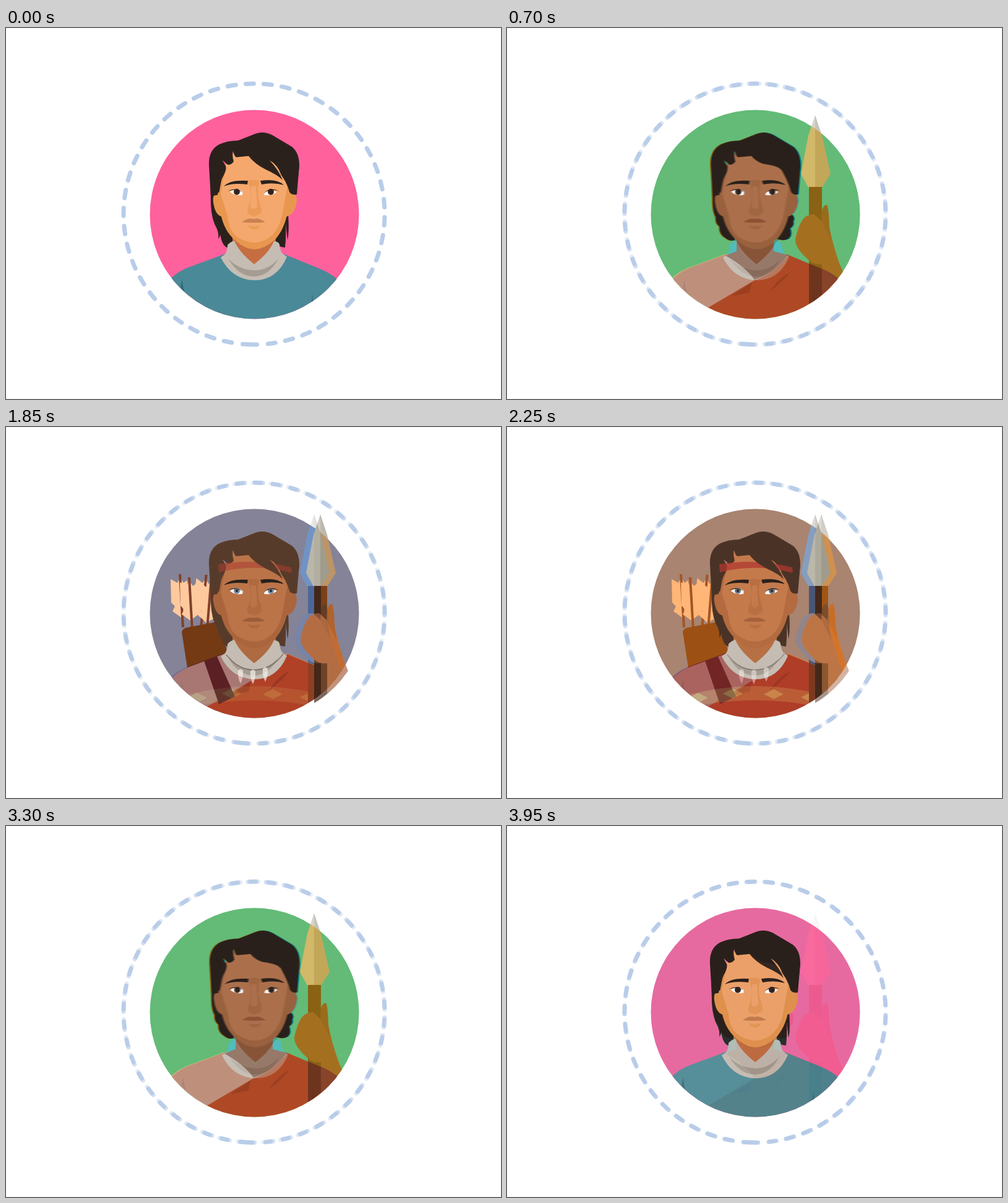
An HTML page for the animation above (4000 ms loop, 800 by 600 pixels).

```html
<!DOCTYPE html>
<html lang="en">
<head>
<meta charset="utf-8">
<title>Portraits</title>
<style>
html, body { margin: 0; width: 100%; height: 100%; overflow: hidden; background: #fff; }
svg { display: block; width: 800px; height: 600px; }

.bg { fill: var(--bg); }
.skin { fill: var(--skin); }
.shade { fill: var(--shade); }
.neck { fill: var(--neck); }
.hair { fill: var(--hair); }
.iris { fill: var(--iris); }
.lip { fill: var(--lip); }
.cloth { fill: var(--cloth); }
.fold { fill: var(--fold); }
.dark { fill: #2a211d; }
.white { fill: #fff; }
.page { fill: #fff; stroke: #f6f6f6; }
.ring { fill: none; stroke: #b9cde9; stroke-width: 7; stroke-linecap: round; }

.modern { --bg: #ff619d; --skin: #f5a86d; --shade: #e9974f; --neck: #c66e42; --hair: #2b211c;
  --iris: #3a2620; --lip: #c98150; --cloth: #4a8997; --fold: #326878; }
.elder { --bg: #03bcc0; --skin: #8c5f48; --shade: #7b513b; --neck: #774b37; --hair: #2b211c;
  --iris: #3a2620; --lip: #70432f; --cloth: #c9c0b6; --fold: #8f3a1f; }
.autumn { --bg: #f6b80b; --skin: #d98a50; --shade: #c87a44; --neck: #a4623b; --hair: #2b211c;
  --iris: #3a2620; --lip: #bb6c40; --cloth: #ae4a26; --fold: #8a2a22; }
.knit { --bg: #ff8312; --skin: #d98a50; --shade: #ca7b44; --neck: #cb7f48; --hair: #2b211c;
  --iris: #5f463c; --lip: #bd7040; --cloth: #ae312b; --fold: #8a2624; }
.hunter { --bg: #5185d1; --skin: #ae6a46; --shade: #9d5c3b; --neck: #a3623f; --hair: #6b4731;
  --iris: #86abcc; --lip: #8f5336; --cloth: #a69793; --fold: #8f3a1f; }

/* forward for two seconds, then back again */
.fade { opacity: 0; animation: 4s -2ms steps(10, end) infinite; }
.elder { animation-name: fade1; }
.autumn { animation-name: fade2; }
.knit { animation-name: fade3; }
.hunter { animation-name: fade4; }
@keyframes fade1 { 0% { opacity: 0 } 12.5%, 87.5% { opacity: 1 } 100% { opacity: 0 } }
@keyframes fade2 { 0%, 12.5% { opacity: 0 } 25%, 75% { opacity: 1 } 87.5%, 100% { opacity: 0 } }
@keyframes fade3 { 0%, 25% { opacity: 0 } 37.5%, 62.5% { opacity: 1 } 75%, 100% { opacity: 0 } }
@keyframes fade4 { 0%, 37.5% { opacity: 0 } 50% { opacity: 1 } 62.5%, 100% { opacity: 0 } }
</style>
</head>
<body>
<svg viewBox="0 0 800 600">
<defs>
  <clipPath id="disc"><circle cx="401.5" cy="301.5" r="169"/></clipPath>

  <g id="stage">
    <rect class="page" x=".5" y=".5" width="799" height="599"/>
    <circle class="bg" cx="401.5" cy="301.5" r="169"/>
  </g>

  <g id="ring" class="ring">
    <path d="M371.6 509.9A211 211 0 1 1 430.4 509.9" stroke-dasharray="13 16.16"/>
    <path d="M412.5 511.7Q401 512.3 389.5 511.7"/>
  </g>

  <path id="body" class="cloth" d="M250 425Q266 400 290 389L352 366H450L511 391Q536 402 552 425L570 480H240Z"/>
  <g id="folds" class="fold">
    <path d="M285 406Q285 417 289 428Q284 424 282 419Z"/>
    <path d="M495 429L496 441L494 444Z"/>
  </g>

  <path id="longhair" class="hair" d="M330 225L331 285Q332 310 341 325Q344 332 343 341Q348 335 346 327Q346 342 352 351Q359 359 370 354L434 347Q440 354 451 355Q453 338 452 316L455 343Q458 330 456 300L470 260L474 222Z"/>
  <path id="shorthair" class="hair" d="M330 225L331 285Q332 300 336 306Q335 316 342 321Q341 334 352 340Q362 348 372 340H432Q444 346 454 341Q461 336 457 324Q464 320 462 313Q466 306 458 300L470 260L474 222Z"/>

  <path id="neck" class="neck" d="M366 330H436V350L401 384L366 350Z"/>
  <g id="collar">
    <path fill="#c5bdb4" d="M358 351Q362 346 369 344Q376 362 401 382Q425 364 433 345Q440 345 442 350Q443 361 447 365L454 370Q438 408 401 408Q365 407 347 371L354 366Q358 360 358 351Z"/>
    <path fill="#a59c92" d="M359 373Q376 402 401 402Q426 401 440 373Q425 391 402 392Q376 391 359 373Z"/>
  </g>

  <g id="face">
    <path class="shade" d="M346 266Q333 265 335 282Q338 303 349 305ZM455 267Q470 264 470 280Q467 302 453 305Z"/>
    <path class="shade" d="M352 225L344 268L347 300Q352 328 371 344Q387 358 402 358Q418 357 434 343Q450 326 455 298L461 250L446 215Q402 190 365 204Z"/>
    <path class="skin" d="M357 215L347 268L358 304Q360 328 374 338Q388 347 402 347Q420 346 431 334Q444 320 447 298L455 255L444 222Q402 190 365 204Z"/>
    <path class="shade" d="M391 247Q401 243 410 248Q406 258 408 275L413 293Q414 300 408 302L401 305L393 302Q388 299 391 291Q396 280 395 262Z" opacity=".65"/>
    <path class="skin" d="M396 256H404L406 288Q401 296 395 289Z"/>
    <path class="shade" d="M391 319Q401 322 411 319Q409 326 401 326Q393 325 391 319Z" opacity=".7"/>
    <path class="lip" d="M381 314Q392 306 400 309Q408 306 419 314Q400 316 381 314Z"/>
    <path class="white" d="M362 265Q372 257 383 265L382 270Q369 272 362 265ZM417 270Q419 258 438 265Q430 272 417 270Z"/>
    <circle class="iris" cx="373" cy="265" r="5"/>
    <circle class="iris" cx="428" cy="265" r="5"/>
    <circle class="dark" cx="373" cy="265" r="2"/>
    <circle class="dark" cx="428" cy="265" r="2"/>
    <path class="dark" d="M358 264Q372 256 384 267Q373 259 358 264ZM417 267Q427 256 442 264Q428 259 417 267Z"/>
    <path class="dark" d="M352 256Q362 245 391 247L390 253Q367 250 352 256ZM411 247Q438 243 449 254Q432 249 413 253Z"/>
  </g>

  <path id="longtop" class="hair" d="M331 272L328 222Q327 197 345 188Q358 182 375 182L403 171Q416 166 430 173L462 192Q474 202 474 222Q472 247 470 269Q462 271 458 265Q454 250 445 238Q439 221 426 214Q441 230 447 246Q440 238 420 229Q402 220 392 207L372 209Q369 207 367 199Q365 206 368 216Q364 222 358 221L350 214Q353 220 355 223Q357 228 352 238Q345 250 342 270Z"/>
  <path id="shorttop" class="hair" d="M331 272L328 222Q327 197 345 188Q358 182 375 182L403 171Q416 166 430 173L462 192Q474 202 474 222Q472 247 470 269Q462 271 458 265Q454 250 444 232Q440 223 414 220Q401 216 394 207L372 209Q369 207 367 199Q365 206 368 216Q364 222 358 221L350 214Q353 220 355 223Q357 228 352 238Q345 250 342 270Z"/>

  <g id="longhead">
    <use href="#face"/><use href="#longtop"/>
  </g>
  <g id="shorthead">
    <use href="#face"/><use href="#shorttop"/>
  </g>

  <g id="robe">
    <path fill="#b04a26" d="M455 367Q434 396 400 408L322 454L401 490L560 480L552 425Q540 404 511 391Z"/>
    <path class="fold" d="M458 395Q440 403 424 427Q444 412 458 395ZM396 411L362 434L392 428Z"/>
  </g>

  <g id="spear">
    <path fill="#bbb7a9" d="M498 141L487 174L475 236L487 258H498Z"/>
    <path fill="#a09c8d" d="M498 141L509 174L523 236L509 258H498Z"/>
    <g clip-path="url(#disc)">
      <path fill="#44281a" d="M488 257H509V460H488Z"/>
      <path class="arm" d="M466 342Q470 322 477 311Q484 301 496 301L508 312L509 296Q511 286 517 286Q520 290 521 322Q527 352 537 380L550 412L509 450V382Q494 384 484 372Q466 356 466 342Z" fill="var(--arm)"/>
      <path d="M508 312L509 296Q511 286 517 286Q520 290 521 322L524 344Z" fill="#000" opacity=".14"/>
    </g>
  </g>

  <path id="diamond" fill="#e0bd6c" d="M-16 0L0 -8L16 0L0 8Z"/>
  <path id="tooth" fill="#f4efe8" d="M-4 -9Q0 -14 4 -9Q5 2 0 12Q-5 2 -4 -9Z"/>
  <g id="arrow">
    <path fill="#ffe9dc" d="M-15 4L-4 10L0 2L6 10L12 6L15 56L2 66L-12 56L-8 48L-14 42Z"/>
    <path fill="none" stroke="#4b2537" stroke-width="4" d="M0 -4L5 82"/>
  </g>
</defs>

<g class="modern">
  <use href="#stage"/>
  <g clip-path="url(#disc)">
    <use href="#longhair"/><use href="#body"/><use href="#folds"/>
    <use href="#neck"/><use href="#collar"/><use href="#longhead"/>
  </g>
  <use href="#ring" transform="rotate(1.9 401 301)"/>
</g>

<g class="elder fade" style="--arm:#6f4030">
  <use href="#stage"/>
  <g clip-path="url(#disc)">
    <use href="#shorthair"/><use href="#body"/>
    <path class="neck" d="M371 330H431V361L454 367Q435 396 400 407Q385 386 353 368L371 361Z"/>
    <use href="#robe"/><use href="#shorthead"/>
  </g>
  <use href="#spear"/>
  <use href="#ring" transform="rotate(2.9 401 301)"/>
</g>

<g class="autumn fade">
  <use href="#stage"/>
  <g clip-path="url(#disc)">
    <g transform="translate(2)">
      <use href="#shorthair"/><use href="#body"/><use href="#folds"/>
      <use href="#neck"/><use href="#collar"/><use href="#shorthead"/>
    </g>
  </g>
  <use href="#ring" transform="rotate(3.9 401 301)"/>
</g>

<g class="knit fade" style="--arm:#d18548">
  <use href="#stage"/>
  <g clip-path="url(#disc)">
    <use href="#longhair"/><use href="#body"/><use href="#folds"/>
    <path fill="#c46e46" d="M270 440Q401 398 535 440V460Q401 424 270 460Z"/>
    <use href="#diamond" x="309" y="438"/><use href="#diamond" x="365" y="431"/>
    <use href="#diamond" x="431" y="432"/><use href="#diamond" x="491" y="437"/>
    <use href="#neck"/><use href="#collar"/><use href="#longhead"/>
    <path fill="#be2628" d="M343 222Q402 212 461 227L462 236Q402 220 344 235Z"/>
    <path class="hair" d="M391 206Q402 220 420 229Q440 238 447 246Q441 230 426 214Z"/>
  </g>
  <use href="#spear"/>
  <use href="#ring" transform="rotate(4.9 401 301)"/>
</g>

<g class="hunter fade" style="--arm:#a86442">
  <use href="#stage"/>
  <g clip-path="url(#disc)">
    <use href="#arrow" x="281" y="242"/><use href="#arrow" x="296" y="247"/>
    <use href="#arrow" transform="translate(323 243) rotate(9)"/><use href="#arrow" transform="translate(331 251) rotate(8)"/>
    <path fill="#381c16" d="M284 331Q286 325 294 324L336 316Q343 315 346 321L362 380L294 396Z"/>
    <use href="#longhair"/><use href="#body" x="3"/>
    <use href="#robe"/>
    <path fill="#371a20" d="M320 378L341 371L370 436L344 448Z"/>
    <use href="#neck"/><use href="#collar"/>
    <path fill="none" stroke="#6b5a50" stroke-width="1.5" d="M356 368Q375 393 401 393Q430 392 448 367"/>
    <use href="#tooth" x="379" y="403"/><use href="#tooth" x="399" y="404"/><use href="#tooth" x="419" y="400"/>
    <use href="#longhead"/>
  </g>
  <use href="#spear" x="10"/>
  <use href="#ring" transform="rotate(5.9 401 301)"/>
</g>
</svg>
</body>
</html>
```
